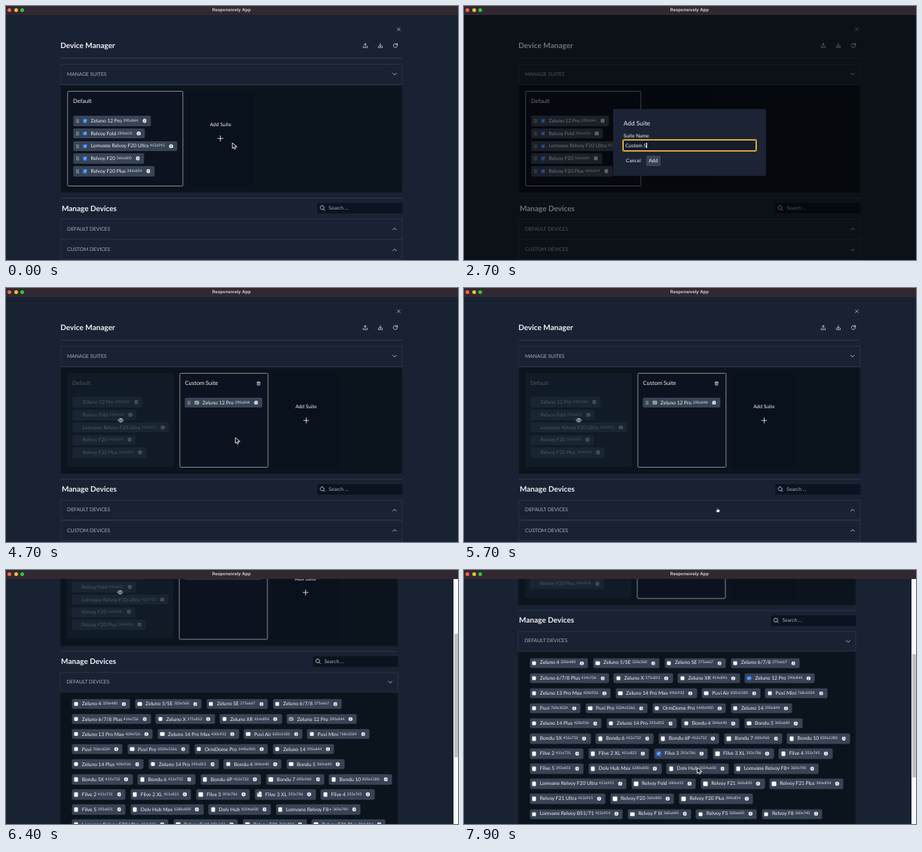
An HTML page for the animation above (8000 ms loop, 600 by 338 pixels).

```html
<!DOCTYPE html>
<html lang="en">
<head>
<meta charset="utf-8">
<title>Device Manager</title>
<style>
html, body { margin: 0; width: 100%; height: 100%; overflow: hidden; background: #192232; }
#stage { position: relative; width: 600px; height: 338px; overflow: hidden; background: #192232;
  color: #f0f2f5; font: 6.667px/10px Lato, sans-serif; text-rendering: geometricPrecision; }
#stage div, #stage svg { position: absolute; box-sizing: border-box; }
.t { white-space: pre; }
svg { fill: none; stroke: currentColor; stroke-width: 2.3; stroke-linecap: round; stroke-linejoin: round; }
.bar { background: #31292f; }
.name { font: 600 5.9px/10px Inter, sans-serif; text-align: center; color: #dcd8da; }
.dot { border-radius: 50%; }
.h1 { font-size: 10px; font-weight: 700; }
.h2 { font-size: 7.5px; }
.h3 { font-size: 8.333px; }
.dim { color: #a9b1be; }
.mid { text-align: center; }
.line { background: #2d3747; }
.head { border: 1px solid #283242; }
.panel { background: #0b131c; border: 1px solid #17212e; }
.card { background: #0c1220; border: 1px solid #7f8692; border-radius: 1.5px; }
.add { background: #09111c; }
.field { background: #0b1220; border-radius: 1.5px; }
#stage .row { display: flex; gap: 6.667px; }
#stage .stack { display: flex; flex-direction: column; align-items: flex-start; gap: 3.35px; }
#stage .chip, #stage .chip * { position: static; flex: none; }
#stage .chip { display: flex; align-items: center; height: 13.4px; padding: 0 5.6px 0 3.3px;
  background: #384355; border-radius: 1.8px; white-space: pre; }
.chip .grip { width: 5.4px; height: 5.4px; margin-right: 4.4px; fill: #cdd3db; stroke: none; }
.chip .cb { width: 5.4px; height: 5.4px; margin-right: 5px; border-radius: 1px; background: #fff; stroke: none; stroke-width: 3.5; }
.chip .on { background: #2d7bf0; stroke: #fff; }
.chip .off { background: #a3a8ae; stroke: #3c434d; }
.chip small { margin-left: 1.7px; font-size: 5px; color: #dfe3e9; }
.chip .info { width: 5.6px; height: 5.6px; margin-left: 5.5px; fill: #e2e6eb; stroke: #384355; stroke-width: 2.6; }
.made .card.old { width: 142px !important; height: 125px !important; background: #101b27; border-color: transparent; }
.made .card.old > .fade { opacity: .27; margin-left: -1.2px; }
.made .old .grip { display: none; }
.made .old .cb { visibility: hidden; }
.made .old .stack { margin-top: -.8px; }
.modal { background: #1b2334; border-radius: 1.8px; }
.input { background: #151c2b; border: 1px solid #f6c755; outline: .6px solid #b9801f; border-radius: 1px; }
.btn { background: #384355; border-radius: 1.5px; }
.track { background: #fafafa; }
.thumb { background: #c1c1c1; }
</style>
</head>
<body>
<div id="stage"></div>
<script>
const LOOP = 8000;
const stage = document.getElementById('stage');
const px = v => v + 'px';

function box(parent, x, y, w, h, cls = '', text = '') {
  const el = document.createElement('div');
  el.className = cls;
  Object.assign(el.style, { left: px(x), top: px(y) });
  if (w) el.style.width = px(w);
  if (h) el.style.height = px(h);
  el.textContent = text;
  parent.append(el);
  return el;
}
const group = (parent, cls) => box(parent, 0, 0, 0, 0, cls);
const label = (parent, x, y, text, cls = '') => box(parent, x, y - 5, 0, 10, 't ' + cls, text);
const svg = (d, cls = '', style = '') =>
  `<svg class="${cls}" style="${style}" viewBox="0 0 24 24"><path d="${d}"/></svg>`;
function icon(parent, d, x, y, size, cls = '') {
  const el = box(parent, x - size / 2, y - size / 2, size, size);
  el.innerHTML = svg(d, cls, 'width:100%;height:100%;left:0;top:0');
  return el;
}

const ICON = {
  up: 'M3 15v6h18v-6M12 16V3M7 8l5-5 5 5',
  down: 'M3 15v6h18v-6M12 3v13M7 11l5 5 5-5',
  reload: 'M20 8A9 9 0 1 0 21 13M21 2v7h-7',
  close: 'M4 4l16 16M20 4L4 20',
  chevDown: 'M4 8l8 8 8-8',
  chevUp: 'M4 16l8-8 8 8',
  plus: 'M12 2v20M2 12h20',
  trash: 'M3 6h18M8 6V3h8v3M5 6v15h14V6M10 10v7M14 10v7',
  eye: 'M1 12Q12-3 23 12Q12 27 1 12M12 8a4 4 0 1 0 .1 0',
  search: 'M10 2a8 8 0 1 0 .1 0M16 16l6 6',
  tick: 'M5 12l5 5 9-11',
  info: 'M12 11.5v5M12 7v.1',
  grip: [2, 10, 18].map(y => `M5 ${y}h5v5h-5zM14 ${y}h5v5h-5z`).join('')
};
const INFO = `<svg class="info" viewBox="0 0 24 24"><circle cx="12" cy="12" r="12" stroke="none"/><path d="${ICON.info}"/></svg>`;

function chip(parent, spec, check = '', grip = false) {
  const cut = spec.lastIndexOf(' ');
  const el = box(parent, 0, 0, 0, 0, 'chip');
  el.innerHTML = (grip ? svg(ICON.grip, 'grip') : '') + svg(ICON.tick, 'cb ' + check) +
    `<span>${spec.slice(0, cut)}</span><small>${spec.slice(cut + 1)}</small>` + INFO;
  return el.querySelector('.cb');
}

const SUITE = ['Zeluno 12 Pro 390x844', 'Relvoy Fold 280x653', 'Lomvane Relvoy F20 Ultra 412x915',
  'Relvoy F20 360x800', 'Relvoy F20 Plus 384x854'];
const DEVICES = [
  'Zeluno 4 320x480,Zeluno 5/SE 320x568,Zeluno SE 375x667,Zeluno 6/7/8 375x667',
  'Zeluno 6/7/8 Plus 414x736,Zeluno X 375x812,Zeluno XR 414x896,Zeluno 12 Pro 390x844',
  'Zeluno 13 Pro Max 428x926,Zeluno 14 Pro Max 430x932,Puvi Air 820x1180,Puvi Mini 768x1024',
  'Puvi 768x1024,Puvi Pro 1024x1366,OrmDome Pro 1440x900,Zeluno 14 390x844',
  'Zeluno 14 Plus 428x926,Zeluno 14 Pro 393x852,Bondu 4 384x640,Bondu 5 360x640',
  'Bondu 5X 412x732,Bondu 6 412x732,Bondu 6P 412x732,Bondu 7 600x960,Bondu 10 800x1280',
  'Filve 2 411x731,Filve 2 XL 411x823,Filve 3 393x786,Filve 3 XL 393x786,Filve 4 353x745',
  'Filve 5 393x851,Dolv Hub Max 1280x800,Dolv Hub 1024x600,Lomvane Relvoy F8+ 360x740',
  'Lomvane Relvoy F20 Ultra 412x915,Relvoy Fold 280x653,Relvoy F21 360x800,Relvoy F21 Plus 384x854',
  'Relvoy F21 Ultra 412x915,Relvoy F20 360x800,Relvoy F20 Plus 384x854',
  'Lomvane Relvoy B51/71 412x914,Relvoy F III 360x640,Relvoy F5 360x640,Relvoy F8 360x740',
  'Relvoy F9 360x740,Relvoy F9 Plus 412x846,Relvoy F10 360x760'
];

// Page; x is measured from the left edge of the content column
const page = group(stage);
const rights = [];
const pin = el => { rights.push(el); return el; };
const wides = [];
const wide = (parent, y, h, cls) => {
  const el = box(parent, 0, y, 454, h, cls);
  wides.push(el);
  return el;
};
const chevron = (parent, d, y) => pin(icon(parent, d, 443.5, y, 7.2));

pin(icon(page, ICON.close, 449, 30.7, 6));
label(page, 0, 53.3, 'Device Manager', 'h1');
['up', 'down', 'reload'].forEach((k, i) => pin(icon(page, ICON[k], 404.5 + i * 20, 53, 7.2)));
wide(page, 69.3, .8, 'line');
wide(page, 76.5, 28, 'head');
label(page, 8.8, 90.5, 'MANAGE SUITES', 'dim');
chevron(page, ICON.chevDown, 90.5);

const panel = wide(page, 104.5, 144.5, 'panel');
const old = box(page, 8.8, 113, 154, 127, 'card old');
const oldBody = group(old, 'fade');
label(oldBody, 7, 12.8, 'Default', 'h2');
const stack = box(oldBody, 7, 32.2, 0, 0, 'stack');
SUITE.forEach(s => chip(stack, s, 'on', true));
const eye = icon(page, ICON.eye, 79.7, 176, 8);

const custom = box(page, 157.7, 113, 118.3, 125.5, 'card');
label(custom, 6.6, 13, 'Custom Suite', 'h2');
icon(custom, ICON.trash, 104.6, 12.6, 6);
const own = box(custom, 6.4, 32, 0, 0, 'stack');
const ownBox = chip(own, SUITE[0], 'off', true);

const add = box(page, 169, 113, 87, 127, 'add');
box(add, 0, 40, 87, 10, 'mid', 'Add Suite');
icon(add, ICON.plus, 43.5, 63.7, 8.5);

const lower = group(page);
wide(lower, 255, .8, 'line');
label(lower, 1.6, 269.5, 'Manage Devices', 'h1');
const field = pin(box(lower, 341, 262, 113.3, 14, 'field'));
icon(field, ICON.search, 6.8, 7, 7.8);
label(field, 15, 7.2, 'Search ...', 'dim');
wide(lower, 283, 27.7, 'head');
label(lower, 8.8, 296.6, 'DEFAULT DEVICES', 'dim');
const chevUp = chevron(lower, ICON.chevUp, 296.6);
const chevDown = chevron(lower, ICON.chevDown, 296.6);

const closed = group(lower);
wide(closed, 310.4, 28, 'head');
label(closed, 8.8, 324.2, 'CUSTOM DEVICES', 'dim');
chevron(closed, ICON.chevUp, 324.2);

const list = group(lower);
wide(list, 310.7, 330, 'panel');
const boxes = {};
DEVICES.forEach((line, i) => {
  const row = box(list, 15.6, 319.3 + i * 20.07, 0, 0, 'row');
  line.split(',').forEach(s => {
    boxes[s.slice(0, s.lastIndexOf(' '))] = chip(row, s);
  });
});

// Dialog
const dialog = box(stage, 0, 0, 600, 338);
const shade = box(dialog, 0, 0, 600, 338);
shade.style.background = 'rgba(0,0,0,.53)';
const modal = box(dialog, 198.3, 137.3, 202.7, 88.7, 'modal');
label(modal, 13.5, 18.4, 'Add Suite', 'h3');
label(modal, 13.5, 35.5, 'Suite Name');
const input = box(modal, 13, 41.2, 176.6, 14.2, 'input');
const value = label(input, 1.9, 6.2, '');
const caret = document.createElement('span');
const typed = document.createElement('span');
caret.style.cssText = 'display:inline-block;width:.7px;height:7px;margin-right:-.7px;background:#fff;vertical-align:-1px';
const hint = label(input, 1.9, 6.2, 'My Custom Suite', 'dim');
value.append(typed, caret);
label(modal, 16.8, 68.8, 'Cancel');
box(modal, 43.4, 61.8, 19, 13.8, 'btn');
label(modal, 47, 68.8, 'Add');

const track = box(stage, 594.2, 11.7, 6, 327, 'track');
const thumb = box(track, 1, 0, 4.4, 164, 'thumb');

// Window bar
box(stage, 0, 0, 600, 11.7, 'bar');
['#f65f57', '#f7bd2e', '#2ac840'].forEach((c, i) => {
  box(stage, 2.3 + i * 8.3, 3.4, 5, 5, 'dot').style.background = c;
});
box(stage, 0, 1.2, 598.5, 10, 'name', 'Responsively App');

// Pointers
const pointer = group(stage);
const arrow = icon(pointer, 'M2 1v19l5-4 3 7 4-2-3-7h7z', 4, 4.5, 9);
const hand = icon(pointer, 'M8 13V3q2-2 3 0v6l9 2q2 1 1 5l-2 7H9l-6-8q1-3 5 0z', 1.5, 3.3, 7.5);
[[arrow, '#111', '#fff'], [hand, '#fff', '#222']].forEach(([el, fill, edge]) => {
  el.firstChild.style.fill = fill;
  el.firstChild.style.stroke = edge;
});

// Each key: [time, value, ...]
const MOUSE = [[100, 299.5, 182], [200, 282.5, 175.5], [3300, 282.5, 175.5], [3600, 250, 204],
  [4000, 250, 204], [4300, 303.5, 199], [5400, 303.5, 199], [5700, 335, 291.5],
  [6600, 335, 291.5], [7000, 258, 242], [7350, 258, 242], [7700, 308.8, 263]];
const SCROLL = [[6150, 0], [6200, 1.6], [6400, 146], [6500, 180], [6600, 195], [6750, 200.6]];
const FADE = [[500, 0], [800, 1], [3700, 1], [3900, 0]];
const NAME = 'Custom Suite';

function at(keys, t, k = 1) {
  const i = keys.findIndex(p => p[0] > t);
  if (i === 0) return keys[0][k];
  if (i < 0) return keys[keys.length - 1][k];
  const a = keys[i - 1], b = keys[i];
  return a[k] + (b[k] - a[k]) * (t - a[0]) / (b[0] - a[0]);
}
const show = (el, on) => { el.style.visibility = on ? '' : 'hidden'; };
const display = (el, on) => { el.style.display = on ? '' : 'none'; };
const mark = (el, state) => el.setAttribute('class', 'cb ' + state);

function render(t) {
  const made = t >= 3800, open = t >= 6000, picked = t >= 7200;
  const scroll = at(SCROLL, t);
  const width = open ? 449.4 : 454;

  stage.classList.toggle('made', made);
  page.style.transform = `translate(${open ? 71.5 : 72.3}px,${-scroll}px)`;
  wides.forEach(el => { el.style.width = px(width); });
  rights.forEach(el => { el.style.marginLeft = px(open ? -5 : 0); });
  panel.style.height = px(made ? 143 : 144.5);
  lower.style.top = px(made ? -1.5 : 0);
  display(custom, made);
  display(eye, made);
  add.style.left = px(made ? 282.5 : 169);

  display(chevUp, !open);
  display(chevDown, open);
  display(closed, !open);
  display(list, open);
  mark(boxes['Zeluno 12 Pro'], picked ? 'on' : 'off');
  mark(ownBox, picked ? 'on' : 'off');
  mark(boxes['Filve 3'], picked ? 'on' : '');

  const count = Math.max(0, Math.min(NAME.length, Math.floor((t - 1820) / 108)));
  typed.textContent = NAME.slice(0, count);
  display(hint, count === 0);
  show(caret, count > 0 || (t + 200) % 1000 < 600);
  const fade = at(FADE, t);
  dialog.style.opacity = fade;
  display(dialog, fade > 0);

  display(track, open);
  thumb.style.top = px(scroll * .5);

  const overHead = t >= 5650 && t < 6650;
  pointer.style.transform = `translate(${at(MOUSE, t)}px,${at(MOUSE, t, 2)}px)`;
  show(pointer, t < 1820 || t >= 3300);
  display(arrow, !overHead);
  display(hand, overHead);
}

const start = performance.now();
function tick() {
  render((performance.now() - start) % LOOP);
  requestAnimationFrame(tick);
}
tick();
</script>
</body>
</html>
```
